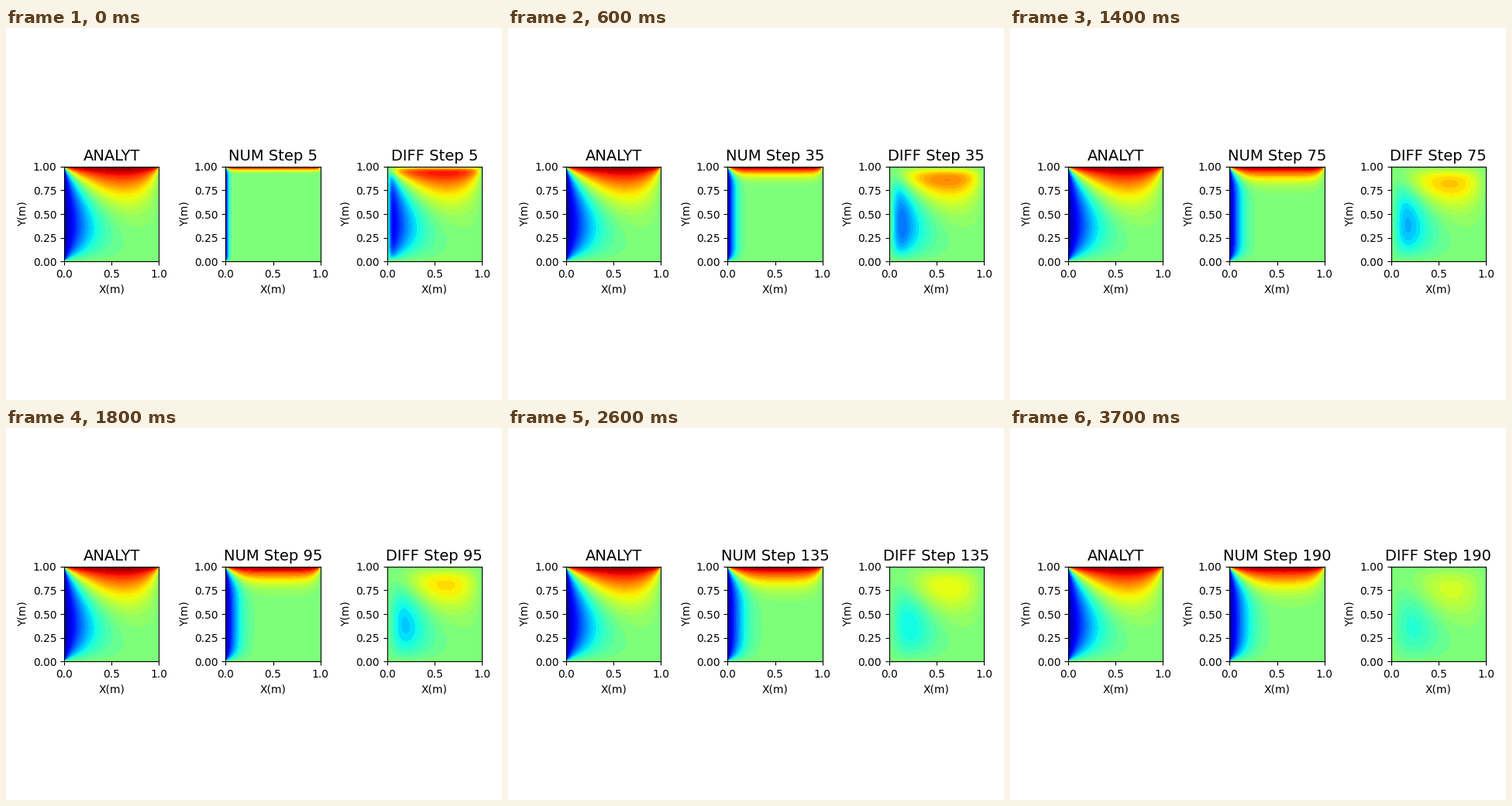
Recreate the animation shown at these times as a matplotlib script. Size 640 px wide and 480 px high, loop 3800 ms.

```python
import numpy as np
import matplotlib.pyplot as plt
from matplotlib.animation import FuncAnimation

W, H, DPI = 640, 480, 100
FRAMES, STEPS_PER_FRAME, INTERVAL = 38, 5, 100
N = 51
LEVELS = np.linspace(-1, 1, 40)

grid = np.linspace(0, 1, N)


def initial_field():
    """Plate at zero, hot top edge and cold left edge."""
    u = np.zeros((N, N))
    u[-1, 1:-1] = 1
    u[1:-1, 0] = -1
    return u


def relax(u, steps):
    """Jacobi iterations of the Laplace equation."""
    for _ in range(steps):
        u = u.copy()
        u[1:-1, 1:-1] = (u[:-2, 1:-1] + u[2:, 1:-1]
                         + u[1:-1, :-2] + u[1:-1, 2:]) / 4
    return u


steady = relax(initial_field(), 6000)
fields = [relax(initial_field(), STEPS_PER_FRAME)]
while len(fields) < FRAMES:
    fields.append(relax(fields[-1], STEPS_PER_FRAME))


def paint(ax, field, title):
    for old in list(ax.collections):
        old.remove()
    ax.contourf(grid, grid, np.clip(field, -1, 1), levels=LEVELS,
                cmap="jet", vmin=-1, vmax=1)
    ax.set_title(title, fontsize=14)


def update(frame):
    step = (frame + 1) * STEPS_PER_FRAME
    paint(num_ax, fields[frame], f"NUM Step {step}")
    paint(diff_ax, steady - fields[frame], f"DIFF Step {step}")


plt.rcParams["font.family"] = "DejaVu Sans"
fig, axes = plt.subplots(1, 3, figsize=(W / DPI, H / DPI), dpi=DPI,
                         facecolor="white")
exact_ax, num_ax, diff_ax = axes
for ax in axes:
    ax.set(xlim=(0, 1), ylim=(0, 1), xlabel="X(m)", ylabel="Y(m)",
           xticks=[0, 0.5, 1], yticks=[0, 0.25, 0.5, 0.75, 1])
    ax.set_aspect("equal", adjustable="box")

paint(exact_ax, steady, "ANALYT")
update(0)
fig.tight_layout()

anim = FuncAnimation(fig, update, frames=FRAMES, interval=INTERVAL,
                     init_func=lambda: update(0), repeat=True, blit=False)
plt.show()
```
